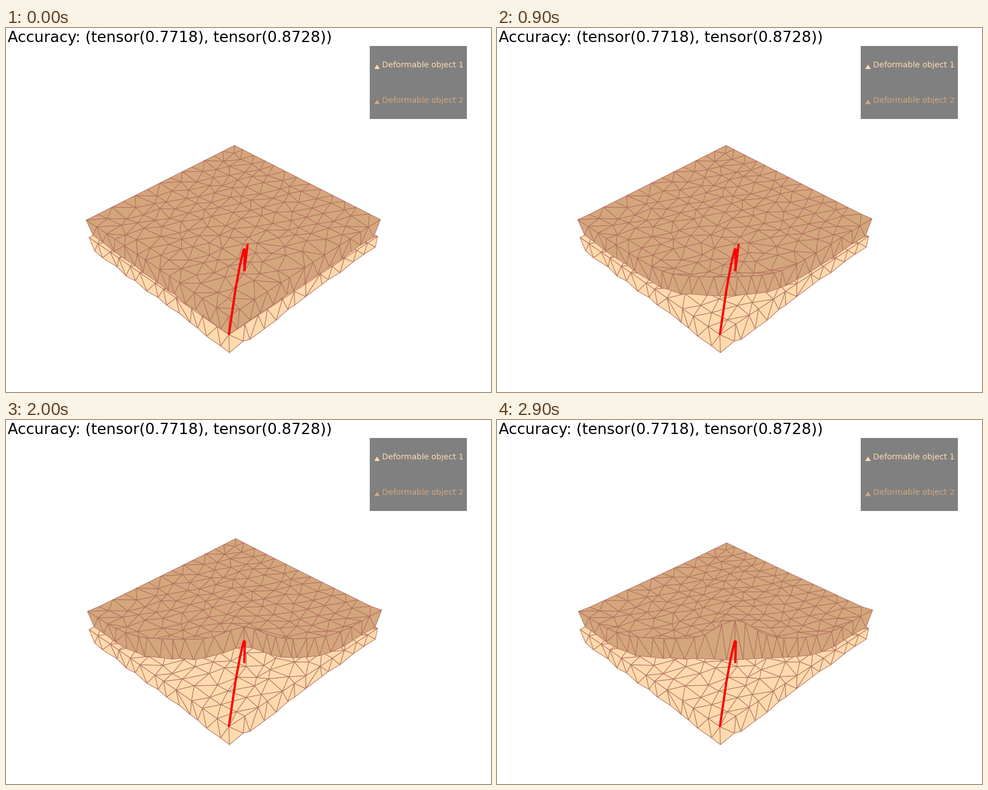
These frames come from a looping animation (864 px wide and 648 px high, 3000 ms). A matplotlib script:

```python
import numpy as np
import matplotlib.pyplot as plt
from matplotlib.animation import FuncAnimation
from matplotlib.collections import PolyCollection
from matplotlib.patches import Polygon, Rectangle
from matplotlib.tri import Triangulation

W, H, FRAMES = 864, 648, 30
LIGHT, DARK, EDGE = "#ffdaad", "#d4a67c", "#b07060"
rng = np.random.default_rng(7)

# Left, front and right corners of each lower outline
RIM = [(143, 342), (397, 513), (667, 341)]
BASE = [(155, 369), (397, 546), (655, 372)]
FLOOR = [(158, 397), (398, 578), (658, 390)]

# Height of the pulled corner: up, back down, up again
TURNS = [0, 19.5, 23, 29]
RIM_TIP = [513, 367, 385, 357]
BASE_TIP = [546, 400, 434, 428]


def outline(corners, x):
    return np.interp(x, *np.transpose(corners))


def soft_min(a, b, k):
    return (a + b - np.sqrt((a - b) ** 2 + k ** 2)) / 2


def corner_shift(frame):
    return min(1.4 * frame, 27)


def folded(corners, tips, rest_level, x, frame):
    """Outline whose front corner is lifted to a ceiling, peaked at the grip."""
    rise = corners[1][1] - 7.6 * frame
    sag = -soft_min(-rise, -rest_level, 16)
    tip = np.interp(frame, TURNS, tips)
    grip_x = 397 + corner_shift(frame)
    ceiling = sag + (tip - sag) * np.exp(-((x - grip_x) / 45) ** 2)
    return soft_min(outline(corners, x), ceiling, min(24, 6 * frame))


def homography(quad):
    rows, rhs = [], []
    for (u, v), (x, y) in zip([(0, 0), (1, 0), (1, 1), (0, 1)], quad):
        rows += [[u, v, 1, 0, 0, 0, -u * x, -v * x],
                 [0, 0, 0, u, v, 1, -u * y, -v * y]]
        rhs += [x, y]
    return np.append(np.linalg.solve(rows, rhs), 1).reshape(3, 3)


def sheet(quad, n):
    """Irregular triangulated square seen in perspective."""
    def along():
        s = np.arange(n + 1) / n
        s[1:-1] += rng.uniform(-.2, .2, n - 1) / n
        return s

    uv = [(s, 0) for s in along()] + [(s, 1) for s in along()]
    uv += [(0, s) for s in along()[1:-1]] + [(1, s) for s in along()[1:-1]]
    for r in range(1, n):
        for c in range(n):
            u, v = np.array([r, c + .5 * (r % 2)]) + rng.uniform(-.27, .27, 2)
            if .5 < v < n - .5:
                uv.append((u / n, v / n))
    uv = np.array(uv)
    tris = Triangulation(*uv.T).triangles
    p = np.c_[uv, np.ones(len(uv))] @ homography(quad).T
    pts = p[:, :2] / p[:, 2:]
    front = np.flatnonzero((uv == 1).any(axis=1))
    front = front[np.argsort(pts[front, 0])]
    tris = tris[np.argsort(pts[tris, 1].mean(axis=1))]
    return pts, tris, front


def strip(a, b, x):
    """Triangles between two chains of vertices sorted by x."""
    tris, i, j = [], 0, 0
    while i < len(a) - 1 or j < len(b) - 1:
        more_a, more_b = i < len(a) - 1, j < len(b) - 1
        if not more_b or (more_a and x[a[i + 1]] < x[b[j + 1]]):
            tris.append((a[i], a[i + 1], b[j]))
            i += 1
        else:
            tris.append((a[i], b[j], b[j + 1]))
            j += 1
    return tris


def slab(quad, bottom, n, rough):
    """Top sheet plus the two visible side walls."""
    pts, tris, front = sheet(quad, n)
    left, mid, right = (x for x, _ in bottom)
    x = np.r_[np.linspace(left, mid, 14), np.linspace(mid, right, 14)[1:]]
    inner = np.r_[1:13, 14:26]
    x[inner] += rng.uniform(-5, 5, len(inner))
    y = outline(bottom, x)
    y[inner] += rng.uniform(-rough, rough, len(inner))
    wall = np.arange(len(x)) + len(pts)
    pts = np.vstack([pts, np.c_[x, y]])
    return pts, np.vstack([tris, strip(front, wall, pts[:, 0])]), front, wall


low, low_tris, _, _ = slab([(407, 240), (148, 373), (397, 546), (662, 371)],
                           FLOOR, 12, 3)
up, up_tris, rim, wall = slab([(407, 209), RIM[0], RIM[1], RIM[2]], BASE, 13, 1.5)
wall_noise = up[wall, 1] - outline(BASE, up[wall, 0])


def upper_points(frame):
    x0, y0 = up.T
    depth = np.clip((y0 - 380) / 100, 0, 1)
    pull = .08 + .92 * depth * np.exp(-((x0 - 397) / 90) ** 2)
    x = x0 + corner_shift(frame) * pull
    y = y0 + 12 * (frame / 29) ** 3 * np.clip((345 - y0) / 136, 0, 1)

    # Squeeze the surface back; what is left over tucks behind the wall
    edge = folded(RIM, RIM_TIP, 391, x, frame)
    lift = np.maximum(outline(RIM, x0) - edge, 0)
    limit = edge + np.minimum(15, lift / 2)
    y = np.where(lift > 0, soft_min(y, limit, .25 * lift), y)
    y[rim] = edge[rim]
    y[wall] = folded(BASE, BASE_TIP, 426, x[wall], frame) + wall_noise
    return np.c_[x, y]


fig = plt.figure(figsize=(W / 72, H / 72), dpi=72, facecolor="white")
ax = fig.add_axes([0, 0, 1, 1])
ax.set(xlim=(0, W), ylim=(H, 0))
ax.axis("off")


def mesh(verts, color, z):
    return ax.add_collection(PolyCollection(
        verts, facecolor=color, edgecolor=EDGE, linewidth=1,
        joinstyle="round", zorder=z), autolim=False)


def red_line(x, y):
    return ax.plot(x, y, color="red", lw=4, zorder=3,
                   solid_capstyle="butt", solid_joinstyle="bevel")[0]


mesh(low[low_tris], LIGHT, 1)
upper = mesh(up[up_tris], DARK, 2)
red_line([397, 402, 409, 417, 423.5, 425.5, 424.5],
         [546, 512, 464, 421, 394, 394, 433])
tail = red_line([], [])

ax.text(3, 25, "Accuracy: (tensor(0.7718), tensor(0.8728))",
        family="DejaVu Sans", size=26.85, color="black", va="baseline")
ax.add_patch(Rectangle((648, 32), 173, 130, color="#808080", lw=0))
for k, color in enumerate([LIGHT, DARK]):
    y = 73 + 62.5 * k
    ax.add_patch(Polygon([(656, y), (666, y), (661, y - 8)],
                         color=color, lw=0, zorder=2))
    ax.text(669.5, y - 3, f"Deformable object {k + 1}", family="DejaVu Sans",
            size=14.2, color=color, va="baseline")


def draw(frame):
    upper.set_verts(upper_points(frame)[up_tris])
    # The last stroke disappears behind the rising rim
    start = np.clip(np.interp(frame, TURNS, RIM_TIP), 384, 433)
    tail.set_data([430.5 - 6 * (start - 384) / 49, 430.5], [start, 384])
    tail.set_visible(bool(frame < 17))
    return upper, tail


anim = FuncAnimation(fig, draw, frames=FRAMES, interval=100, repeat=True, repeat_delay=0)
plt.show()
```
